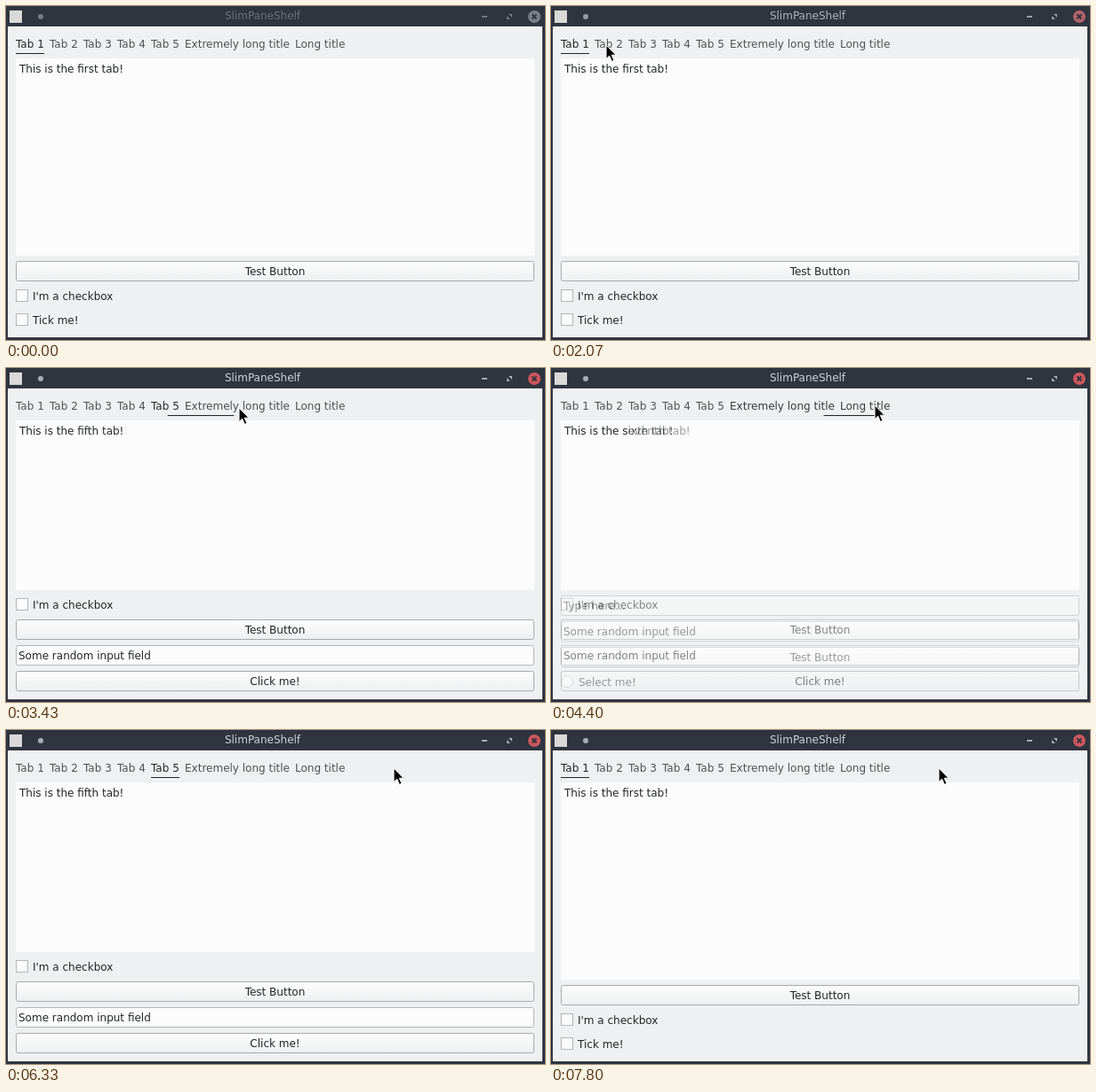
Write an HTML page that moves like this. It is 606x376 px and loops after 8000 ms.

```html
<!DOCTYPE html>
<html lang="en">
<head>
<meta charset="utf-8">
<title>Tab widget</title>
<style>
  html, body { margin: 0; width: 100%; height: 100%; overflow: hidden; background: #2f343f; }
  svg { display: block; width: 606px; height: 376px; --on: 0; }
  text { font: 12px "DejaVu Sans", sans-serif; fill: #232627; white-space: pre; }
  .mid { text-anchor: middle; }
  .box { stroke: #b4b5b6; fill: #fcfcfc; }
  .button { stroke: #a9aaab; fill: url(#sheen); }
  .title { fill: color-mix(in srgb, #cfd3da calc(var(--on) * 100%), #6c727e); }
  .glyph { fill: color-mix(in srgb, #a9adb6 calc(var(--on) * 100%), #757a85); }
  .close { fill: color-mix(in srgb, #cc575d calc(var(--on) * 100%), #7b7f88); }
</style>
</head>
<body>
<svg viewBox="0 0 606 376">
  <defs>
    <linearGradient id="sheen" x2="0" y2="1">
      <stop stop-color="#fdfdfd"/><stop offset="1" stop-color="#eeeff0"/>
    </linearGradient>
  </defs>
  <rect width="606" height="376" fill="#2f343f"/>
  <rect x="2" y="23" width="601" height="350" fill="#eff0f1"/>

  <rect x="4" y="5" width="14" height="14" fill="#d9d9d8"/>
  <circle class="glyph" cx="39" cy="12" r="3"/>
  <text class="title mid" x="288.5" y="15">SlimPaneShelf</text>
  <rect class="glyph" x="535" y="11" width="6" height="2"/>
  <path class="glyph" d="M565 9h4v4zM563 11v4h4z"/>
  <circle class="close" cx="594" cy="12" r="7"/>
  <path d="M591.5 9.5l5 5m0-5l-5 5" stroke="#2f343f" stroke-width="1.8"/>

  <g id="tabs"></g>
  <rect id="line" y="53" height="1" fill="#232627"/>
  <g id="pages"></g>
  <path id="cursor" d="M0 0V15.5L3.6 12.2 6.4 18.4 9 17.2 6.2 11.2H11Z"
        fill="#000" stroke="#fff" stroke-linejoin="round"/>
</svg>
<script>
const LOOP = 8000, FADE = 300, BOTTOM = 364, GAP = 6;

// label, x, underline width
const tabs = [
  ['Tab 1', 11, 32], ['Tab 2', 49, 32], ['Tab 3', 87, 32], ['Tab 4', 125, 32],
  ['Tab 5', 163, 32], ['Extremely long title', 201, 118], ['Long title', 325, 56],
];

const button = ['button', 'Test Button'], click = ['button', 'Click me!'];
const field = ['input', 'Some random input field'], type = ['input', 'Type here...'];
const check = ['check', "I'm a checkbox"], tick = ['check', 'Tick me!'];
const radio = ['radio', "I'm a radiobutton"], select = ['radio', 'Select me!'];
const contents = [
  ['first', button, check, tick],
  ['second', field, radio, select],
  ['third', radio, check, tick],
  ['fourth', tick, radio, type],
  ['fifth', check, button, field, click],
  ['sixth', check, button, field, click],
  ['seventh', type, field, button, select],
];

// start time, tab switched to
const switches = [
  [-FADE, 0], [2090, 1], [2646, 4], [3370, 5], [4260, 6], [5557, 5],
  [6055, 4], [6395, 3], [6833, 2], [7170, 1], [7500, 0],
];

// time, x, y of the pointer tip
const pointer = [
  [0, -30, 108], [1300, -30, 108], [1330, -10.5, 107], [1990, 62, 44], [2250, 62, 44],
  [2500, 179, 39], [3030, 179, 39], [3280, 262, 45], [3600, 262, 45], [3800, 384, 46],
  [4100, 384, 46], [4240, 364, 42], [4930, 364, 42], [5060, 284, 38], [5110, 284, 38],
  [5300, 436, 43], [LOOP, 436, 43],
];

const $ = id => document.getElementById(id);
const clamp = v => Math.min(1, Math.max(0, v));
const mix = (a, b, k) => a + (b - a) * k;
const outCubic = k => 1 - (1 - k) ** 3;
const inOutQuad = k => k < 0.5 ? 2 * k * k : 1 - 2 * (1 - k) ** 2;

function add(parent, name, attrs, content = '') {
  const node = document.createElementNS('http://www.w3.org/2000/svg', name);
  for (const key in attrs) node.setAttribute(key, attrs[key]);
  node.textContent = content;
  parent.append(node);
  return node;
}

const framed = kind => kind === 'button' || kind === 'input';

function addRow(page, kind, label, y) {
  const frame = { x: 11.5, y: y - 11, width: 582, height: 22, rx: 2 };
  const place = { x: 14, y: y + 4.5 };
  if (kind === 'button') {
    add(page, 'rect', { ...frame, class: 'button' });
    Object.assign(place, { x: 302.5, class: 'mid' });
  } else if (kind === 'input') {
    add(page, 'rect', { ...frame, class: 'box' });
  } else if (kind === 'check') {
    add(page, 'rect', { x: 11.5, y: y - 7, width: 13, height: 13, class: 'box' });
    place.x = 30;
  } else {
    add(page, 'circle', { cx: 18, cy: y - 0.5, r: 6.5, class: 'box' });
    place.x = 31;
  }
  add(page, 'text', place, label);
}

// Rows stack upwards from the bottom; the text area takes what is left.
function makePage([ordinal, ...rows]) {
  const page = add($('pages'), 'g', {});
  add(page, 'rect', { x: 9, y: 57, width: 588, height: 310, fill: '#eff0f1' });
  let bottom = BOTTOM;
  for (const [kind, label] of [...rows].reverse()) {
    const height = framed(kind) ? 23 : 21;
    addRow(page, kind, label, bottom - height / 2);
    bottom -= height + GAP;
  }
  add(page, 'rect', { x: 11, y: 59, width: 583, height: bottom - 59, fill: '#fcfcfc' });
  add(page, 'text', { x: 15, y: 75 }, `This is the ${ordinal} tab!`);
  return page;
}

const labels = tabs.map(([label, x]) => add($('tabs'), 'text', { x, y: 47 }, label));
const pages = contents.map(makePage);
let shown = -1;

function drawTabs(t) {
  const i = switches.findLastIndex(([start]) => start <= t);
  const [start, to] = switches[i];
  const from = i ? switches[i - 1][1] : to;
  const k = clamp((t - start) / FADE);
  const fade = inOutQuad(k), slide = outCubic(k);

  if (i !== shown) {
    $('pages').replaceChildren(pages[from], pages[to]);
    shown = i;
  }
  pages[from].style.opacity = 1;
  pages[to].style.opacity = from === to ? 1 : fade;

  labels.forEach((label, n) => {
    const weight = n === to ? fade : n === from ? 1 - fade : 0;
    label.style.fillOpacity = mix(0.78, 1, weight);
  });
  $('line').setAttribute('x', mix(tabs[from][1], tabs[to][1], slide));
  $('line').setAttribute('width', mix(tabs[from][2], tabs[to][2], slide));
}

function drawPointer(t) {
  const i = pointer.findLastIndex(([time]) => time <= t);
  const [t0, x0, y0] = pointer[i], [t1, x1, y1] = pointer[i + 1];
  const k = inOutQuad((t - t0) / (t1 - t0));
  $('cursor').setAttribute('transform', `translate(${mix(x0, x1, k)} ${mix(y0, y1, k)})`);
}

const svg = document.querySelector('svg');
const origin = performance.now();

function draw() {
  const t = (performance.now() - origin) % LOOP;
  svg.style.setProperty('--on', clamp((t - 1990) / 120));
  drawTabs(t);
  drawPointer(t);
  requestAnimationFrame(draw);
}
draw();
</script>
</body>
</html>
```
